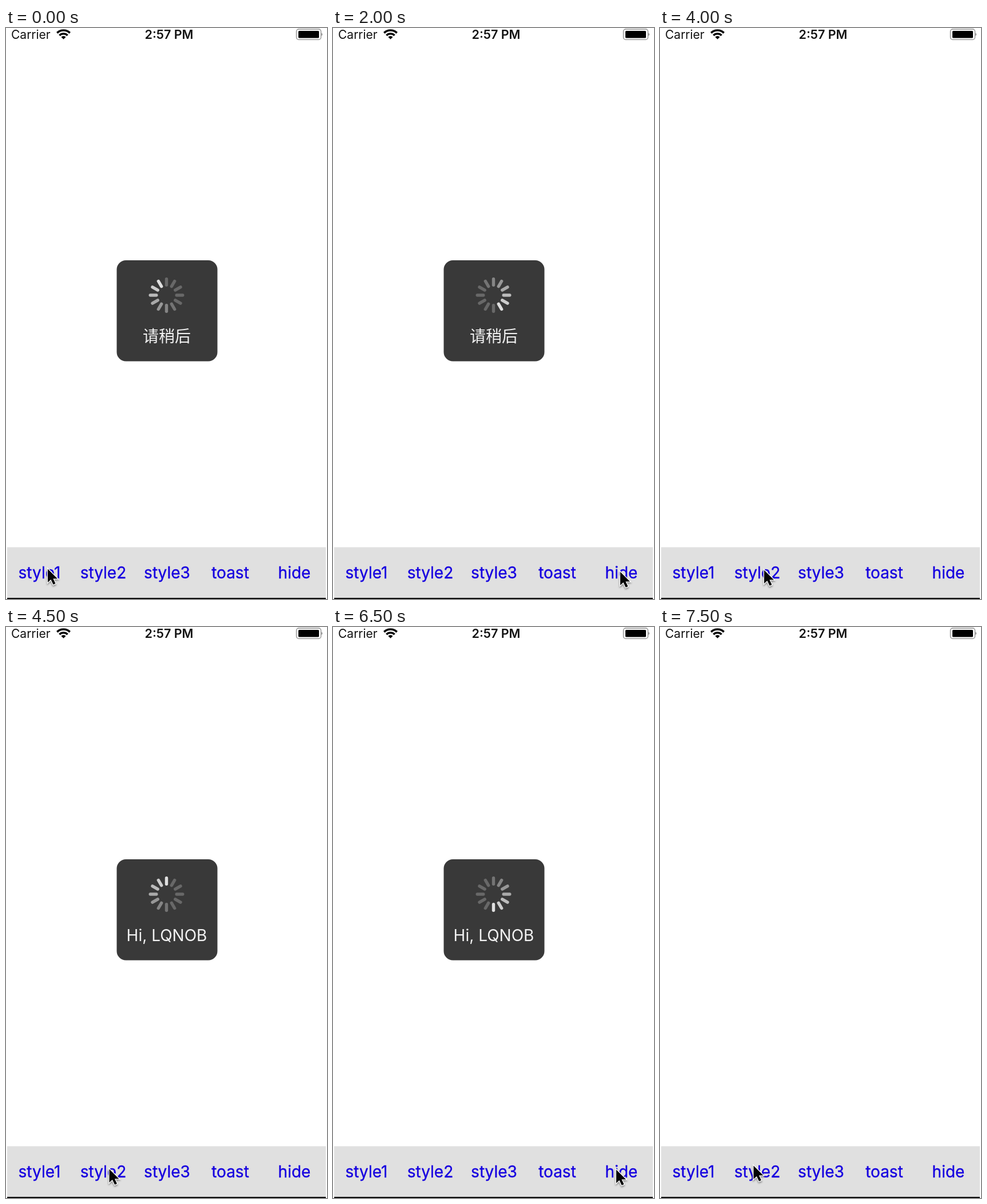
Recreate the animation shown at these times as an HTML page. Size 561 px wide and 998 px high, loop 8000 ms.

```html
<!DOCTYPE html>
<html lang="en">
<head>
<meta charset="utf-8">
<title>Loading panel</title>
<style>
  html, body { margin: 0; width: 100%; height: 100%; overflow: hidden; background: #fff; }
  svg { display: block; width: 100vw; height: 100vh; }
  text { font-family: Inter, "Noto Sans CJK SC", "Noto Sans CJK", sans-serif; font-size: 28px; }
  .status { font-size: 21px; fill: #111; }
  .clock { font-size: 21.5px; font-weight: 600; }
  .mid { text-anchor: middle; }
  #tabs { fill: #1600e0; stroke: #1600e0; stroke-width: .35; }
  #label { fill: #f2f2f2; }
  #pointer { filter: drop-shadow(0 2px 1.5px rgba(0, 0, 0, .4)); }
</style>
</head>
<body>
<svg viewBox="0 0 561 998">
  <text class="status" x="9" y="19">Carrier</text>
  <g fill="none" stroke="#0a0a0a" stroke-width="3.6">
    <path d="M89.3 8.6A16 16 0 0 1 111.7 8.6"/>
    <path d="M93.4 13A10 10 0 0 1 107.6 13"/>
    <path d="M100.5 19.8L96.4 15.8A5.6 5.6 0 0 1 104.6 15.8Z" fill="#0a0a0a" stroke="none"/>
  </g>
  <text class="status clock mid" x="285" y="19">2:57 PM</text>
  <rect x="507.5" y="2" width="43" height="18.3" rx="4" fill="#fff" stroke="#8c8c8c" stroke-width="1.3"/>
  <rect x="511" y="5" width="36" height="12.5" rx="1.5"/>
  <path d="M551.5 8.5Q554.5 11.2 551.5 14Z" fill="#777"/>

  <g id="panel">
    <rect x="193.5" y="406" width="176" height="176.5" rx="16" fill="#393939"/>
    <g id="spinner" transform="translate(280.5 467)" stroke="#fff" stroke-width="5.4" stroke-linecap="round"/>
    <text id="label" class="mid" x="281" y="549"></text>
  </g>

  <rect x="2" y="907.5" width="557" height="89" fill="#e0e0e0"/>
  <rect x="2" y="996" width="557" height="2" fill="#0c0c0c"/>
  <g id="tabs" class="mid"></g>
  <path id="pointer" d="M0 1.5V25L5.4 20L9.6 28.8L13.5 27.1L9.4 18.5H17Z"
        fill="#050505" stroke="#fff" stroke-width="2.6" paint-order="stroke"/>
</svg>
<script>
  const STEP = 500, LOOP = 8000, BARS = 12;
  const NS = "http://www.w3.org/2000/svg";
  const $ = id => document.getElementById(id);

  function add(parent, tag, attrs) {
    const node = document.createElementNS(NS, tag);
    for (const key in attrs) node.setAttribute(key, attrs[key]);
    return parent.appendChild(node);
  }

  [["style1", 58.5], ["style2", 170], ["style3", 281.5], ["toast", 392], ["hide", 504]]
    .forEach(([name, x]) => { add($("tabs"), "text", { x, y: 961.5 }).textContent = name; });

  const bars = Array.from({ length: BARS }, (_, i) =>
    add($("spinner"), "path", { d: "M0 -28.3V-17.7", transform: `rotate(${i * 360 / BARS})` }));

  // Pointer tip: [from ms, x, y]
  const moves = [
    [0, 73, 944], [500, 73, 943], [1500, 503, 951], [2000, 502, 949],
    [3000, 184, 950], [3500, 183, 948], [4000, 182, 946], [4500, 180.5, 946],
    [5000, 340, 947], [5500, 495, 947], [7000, 499, 948], [7500, 163.5, 940]
  ];

  // Panel appearances: spinner head is the leading bar at the start
  const shows = [
    { from: 0, to: 2500, text: "请稍后", head: 11 },
    { from: 4500, to: 7000, text: "Hi, LQNOB", head: 0 }
  ];
  const BARS_PER_STEP = 7.5;

  function draw(time) {
    const t = Math.floor(time % LOOP / STEP) * STEP;
    const [, x, y] = moves.filter(m => m[0] <= t).pop();
    $("pointer").setAttribute("transform", `translate(${x} ${y})`);

    const show = shows.find(s => t >= s.from && t < s.to);
    $("panel").style.display = show ? "" : "none";
    if (!show) return;
    $("label").textContent = show.text;
    const head = Math.floor(show.head + (t - show.from) / STEP * BARS_PER_STEP) % BARS;
    bars.forEach((bar, i) => {
      const age = (head - i + BARS) % BARS;
      bar.setAttribute("stroke-opacity", Math.max(.24, .84 - .09 * age));
    });
  }

  const start = performance.now();
  function tick() {
    draw(performance.now() - start);
    requestAnimationFrame(tick);
  }
  tick();
</script>
</body>
</html>
```
